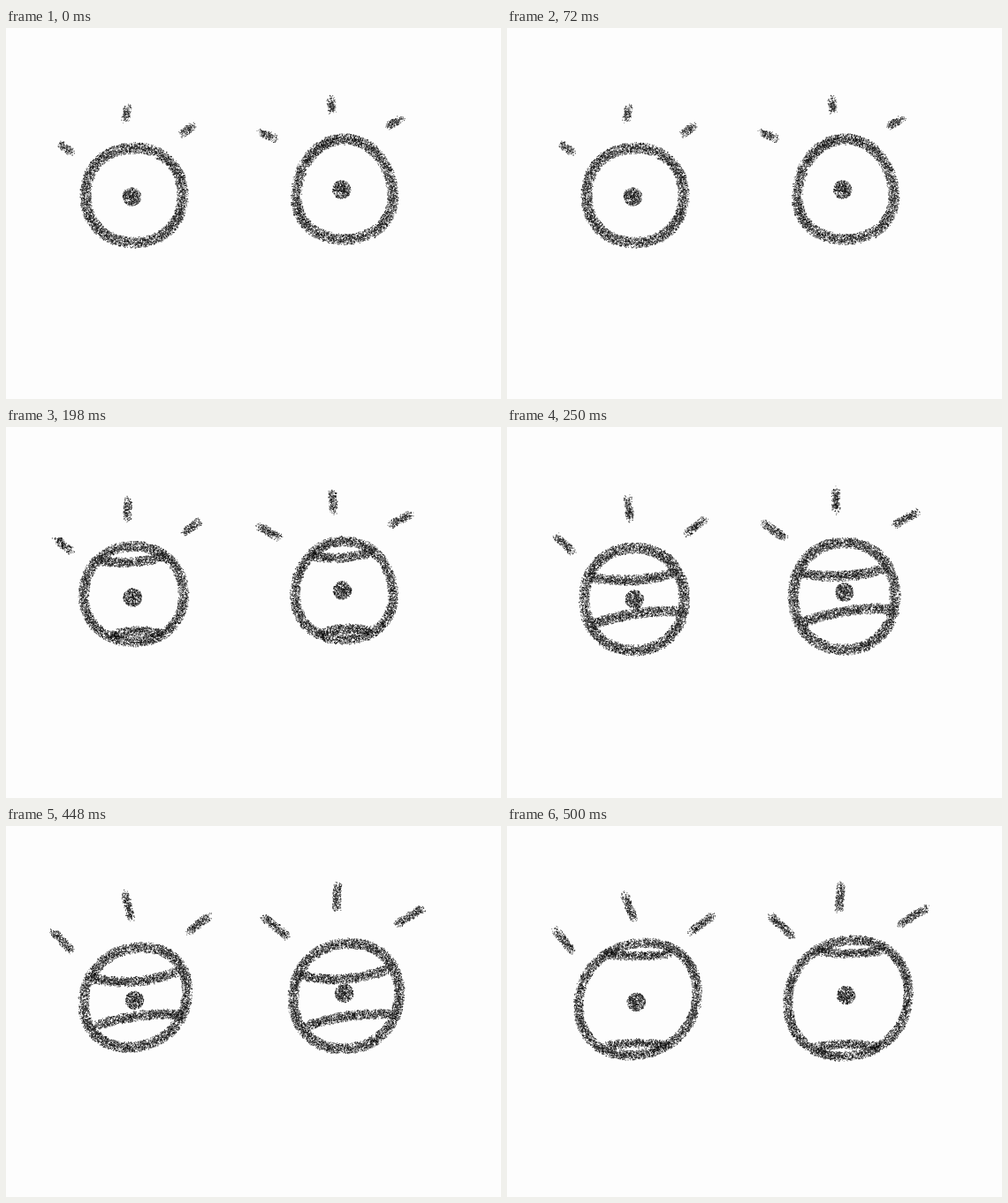
These frames come from a looping animation (560x420 px, 0.62 s). An HTML page with a canvas:

```html
<!DOCTYPE html>
<html lang="en">
<head>
<meta charset="utf-8">
<title>Blinking eyes</title>
<style>
html, body { margin: 0; width: 100%; height: 100%; overflow: hidden; background: #fdfdfd; }
canvas { display: block; }
</style>
</head>
<body>
<canvas id="stage" width="560" height="420"></canvas>
<script>
const W = 560, H = 420, LOOP = 620;
const ctx = document.getElementById('stage').getContext('2d');

const eye = (cx, cy, rx, ry, egg = 0, lean = 0) => ({ cx, cy, rx, ry, egg, lean });
// Lid ends are heights relative to the eye, bow is the sag in the middle.
const lid = (left, right, bow) => ({ left, right, bow });

const poses = [
  { start: 0, weight: 6.6, reach: 16, lids: [],
    eyes: [eye(145, 189.5, 55, 53.5), eye(383, 182.5, 54, 56.5, 0.12)] },
  { start: 120, weight: 6.1, reach: 23, lids: [lid(-0.7, -0.78, 4), lid(0.88, 0.83, -4)],
    eyes: [eye(144.5, 189, 56.5, 54, 0.02), eye(382.5, 185, 55, 55.5, 0.08)] },
  { start: 250, weight: 6.5, reach: 26, lids: [lid(-0.43, -0.52, 6), lid(0.49, 0.24, -5)],
    eyes: [eye(144, 195, 56.5, 58), eye(381.5, 191.5, 57.5, 60.5)] },
  { start: 370, weight: 6.3, reach: 31, lids: [lid(-0.4, -0.52, 8), lid(0.58, 0.35, -5)],
    eyes: [eye(146.5, 194, 58.5, 56, 0, 0.12), eye(385, 192.5, 60, 59.5, 0, 0.05)] },
  { start: 500, weight: 5.8, reach: 31, lids: [lid(-0.82, -0.82, 3), lid(0.84, 0.84, -3)],
    eyes: [eye(148, 196, 67, 63, 0, 0.12), eye(386, 195, 68, 65.5, 0, 0.08)] }
];

// Lashes and pupils drift a little with every step.
const lash = (x, y, drift, angle, turn, scale) => ({ x, y, drift, angle, turn, scale });
const lashes = [
  lash(74, 141, -0.2, 216, 4, 0.95),
  lash(135, 104, 2, 281, -8, 0.92),
  lash(199, 120, 2.3, 323, 0, 0.95),
  lash(304, 125, 4.8, 205, 4.5, 1.1),
  lash(369, 95, 1.7, 264, 2.5, 0.92),
  lash(432, 111, 3.4, 332, -1, 1.1)
];
const pupils = [{ x: 142.3, y: 191 }, { x: 379.6, y: 183 }];

function seeded(seed) {
  return () => {
    seed = (seed + 0x6D2B79F5) | 0;
    let t = Math.imul(seed ^ (seed >>> 15), 1 | seed);
    t = (t + Math.imul(t ^ (t >>> 7), 61 | t)) ^ t;
    return ((t ^ (t >>> 14)) >>> 0) / 4294967296;
  };
}

const soften = v => Math.sign(v) * Math.abs(v) ** 0.94;

function outline(e) {
  return u => {
    const c = soften(Math.cos(u * 2 * Math.PI)), s = soften(Math.sin(u * 2 * Math.PI));
    return [e.cx + e.rx * c * (1 + e.egg * s), e.cy + e.ry * (s - e.lean * c)];
  };
}

function lidCurve(e, l) {
  const half = h => 0.95 * e.rx * Math.sqrt(1 - h * h) * (1 + e.egg * h);
  const x0 = e.cx - half(l.left), x1 = e.cx + half(l.right);
  return u => [
    x0 + (x1 - x0) * u,
    e.cy + e.ry * (l.left + (l.right - l.left) * u) + l.bow * 4 * u * (1 - u)
  ];
}

function lashLine(l, step, reach) {
  const a = (l.angle + l.turn * step) * Math.PI / 180, d = reach * l.scale;
  return u => [l.x + l.drift * step + Math.cos(a) * d * u, l.y + Math.sin(a) * d * u];
}

function pathLength(path) {
  let sum = 0;
  for (let i = 0; i < 24; i++) {
    const [x0, y0] = path(i / 24), [x1, y1] = path((i + 1) / 24);
    sum += Math.hypot(x1 - x0, y1 - y0);
  }
  return sum;
}

function speck(x, y, radius, rnd) {
  const a = rnd() * Math.PI * 2, d = radius * rnd() ** 0.55;
  const size = 0.7 + rnd() * 0.5;
  ctx.fillRect(x + Math.cos(a) * d - size / 2, y + Math.sin(a) * d - size / 2, size, size);
}

// Scatters charcoal grain along a path
function grain(path, radius, rnd) {
  const count = pathLength(path) * radius * 2.1;
  for (let k = 0; k < count; k++) speck(...path(rnd()), radius, rnd);
}

function draw(step) {
  const pose = poses[step], rnd = seeded(71 + step * 997);
  ctx.fillStyle = '#fdfdfd';
  ctx.fillRect(0, 0, W, H);
  ctx.fillStyle = 'rgba(12, 12, 12, 0.74)';
  for (const e of pose.eyes) {
    grain(outline(e), pose.weight, rnd);
    for (const l of pose.lids) grain(lidCurve(e, l), pose.weight - 0.4, rnd);
  }
  for (const l of lashes) grain(lashLine(l, step, pose.reach), 5, rnd);
  for (const p of pupils) {
    for (let k = 0; k < 480; k++) speck(p.x + step, p.y + 2.1 * step, 10.5, rnd);
  }
}

let shown = -1;
function tick() {
  const t = performance.now() % LOOP;
  const step = poses.filter(p => p.start <= t).length - 1;
  if (step !== shown) draw(shown = step);
  requestAnimationFrame(tick);
}
tick();
</script>
</body>
</html>
```
